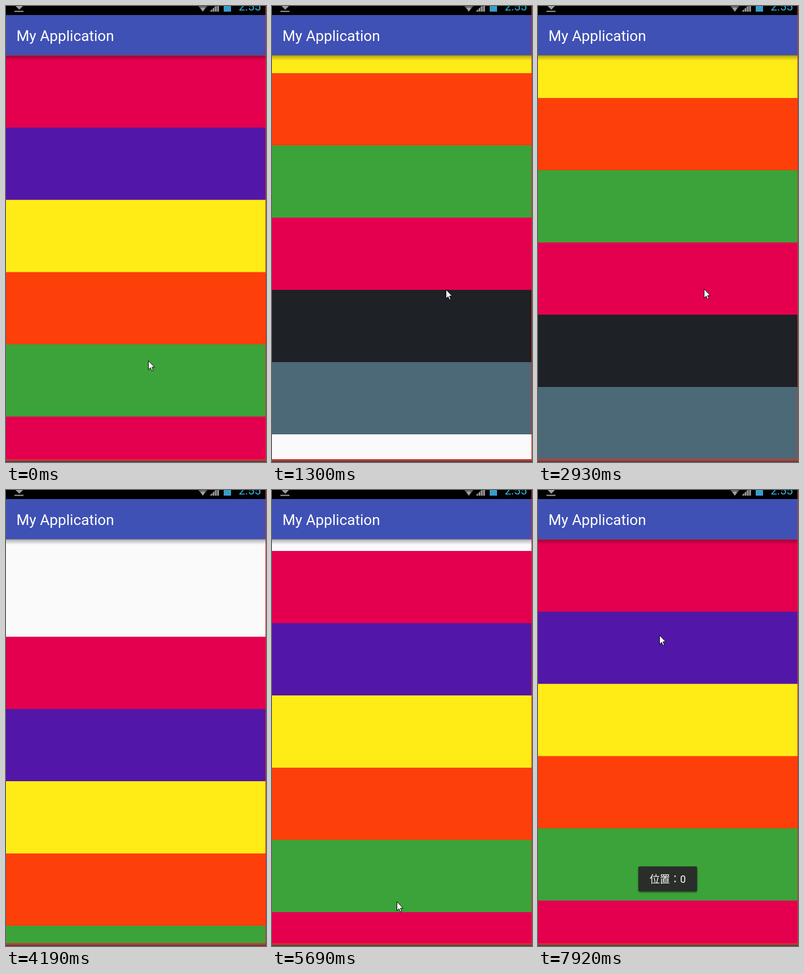
An HTML page for the animation above (8000 ms loop, 461 px wide and 808 px high).

```html
<!DOCTYPE html>
<html lang="ja">
<head>
<meta charset="utf-8">
<title>Overscroll list</title>
<style>
  html, body { margin: 0; width: 100%; height: 100%; overflow: hidden; background: #000; }
  svg { display: block; width: 100vw; height: 100vh; }
  text { font-family: Roboto, "Noto Sans CJK JP", "Noto Sans CJK", sans-serif; }
</style>
</head>
<body>
<svg viewBox="0 0 461 808" preserveAspectRatio="none">
  <defs>
    <linearGradient id="shade" x2="0" y2="1">
      <stop stop-opacity=".5"/>
      <stop offset=".2" stop-opacity=".24"/>
      <stop offset="1" stop-opacity="0"/>
    </linearGradient>
    <radialGradient id="blue">
      <stop stop-color="#1f8fbd" stop-opacity=".75"/>
      <stop offset=".5" stop-color="#2389b3" stop-opacity=".3"/>
      <stop offset="1" stop-color="#2389b3" stop-opacity="0"/>
    </radialGradient>
    <linearGradient id="rim">
      <stop stop-color="#2a8fb8" stop-opacity="0"/>
      <stop offset=".25" stop-color="#2a8fb8"/>
      <stop offset=".75" stop-color="#2a8fb8"/>
      <stop offset="1" stop-color="#2a8fb8" stop-opacity="0"/>
    </linearGradient>
    <filter id="soft" x="-20%" y="-20%" width="140%" height="150%"><feGaussianBlur stdDeviation="1.5"/></filter>
    <clipPath id="view"><rect y="87" width="460" height="716"/></clipPath>
  </defs>

  <g clip-path="url(#view)">
    <rect y="87" width="460" height="716" fill="#fafafa"/>
    <g id="list"></g>
    <g id="glow">
      <ellipse cx="237" cy="804" rx="200" ry="27" fill="url(#blue)"/>
      <rect x="70" y="800" width="335" height="3" fill="url(#rim)"/>
    </g>
    <rect id="bar" x="451" width="5" height="488" fill="#808080" fill-opacity=".6"/>
    <rect y="87" width="460" height="10" fill="url(#shade)"/>
  </g>

  <rect width="460" height="16" fill="#000"/>
  <rect y="16" width="460" height="71" fill="#3f51b5"/>
  <text x="18.5" y="62" font-size="26.2" fill="#fff">My Application</text>
  <g fill="#a0a0a0">
    <path d="M17 0H30L23.5 6.5ZM15 8.5H31V10.5H15Z"/>
    <path d="M341 0H357L349 10Z" fill="#666"/>
    <path d="M345 4Q349 1 353 4L349 10Z"/>
    <path d="M361 10L371 0H378V10Z" fill="#555"/>
    <path d="M364 10V7M368 10V4M372 10V1M376 10V0" stroke="#a0a0a0" stroke-width="2"/>
  </g>
  <rect x="386" width="13" height="10" fill="#3a9dcc"/>
  <text x="412.5" y="8" font-size="20.5" fill="#33b5e5">2:55</text>

  <rect y="803" width="461" height="3" fill="#d9302c"/>
  <rect y="806" width="461" height="2" fill="#454844"/>
  <rect x="460" width="1" height="805" fill="#d9302c"/>

  <g id="toast">
    <rect x="178" y="668.5" width="104" height="44" rx="3" opacity=".6" filter="url(#soft)"/>
    <rect x="178" y="667" width="104" height="44" rx="2" fill="#2a2e2a"/>
    <text x="198" y="696" font-size="18" fill="#fff">位置：0</text>
  </g>
  <path id="cursor" d="M.5 .5V16.5L4.2 13L6.6 18.5L9 17.5L6.7 12H11.5Z" fill="#fff" stroke="#000"/>
</svg>
<script>
const LOOP = 8000, ROW = 128, TOP = 87.5, END = -221, REBOUND = 250;
const colors = ['#e4004f', '#5217a8', '#ffec17', '#fd3f0a', '#3ba339', '#e4004f', '#1e2125', '#4c6978'];
const $ = id => document.getElementById(id);

// Each row reaches one pixel under the next, so no seam shows between them.
$('list').innerHTML = colors.map((c, i) =>
  `<rect y="${i * ROW}" width="460" height="${ROW + (i < colors.length - 1)}" fill="${c}"/>`).join('');

const ramp = (t, from, to) => Math.min(1, Math.max(0, (t - from) / (to - from)));
const easeOut = k => 1 - (1 - k) ** 2;
const pulse = (t, from, until) => ramp(t, from, from + 150) - ramp(t, until, until + 250);

// Drag past the edge, hold, then spring back on release.
const pull = (t, from, to, release, length) =>
  length * (ramp(t, from, to) - easeOut(ramp(t, release, release + REBOUND)));

const scrolled = t => ramp(t, 250, 550) - easeOut(ramp(t, 3050, 3700));

const listY = t => TOP + (END - TOP) * scrolled(t)
  + pull(t, 450, 550, 650, -8)
  + pull(t, 1060, 1990, 2250, -171)
  + pull(t, 3800, 4190, 4330, 172.5)
  + pull(t, 4950, 5390, 5540, 128);

// Mouse strokes: each runs from start to end and stops at x, y.
const home = { x: 252, y: 628 };
const strokes = [
  { start: 250, end: 550, x: 308, y: 360 },
  { start: 650, end: 1060, x: 305, y: 585 },
  { start: 1060, end: 1990, x: 316, y: 266 },
  { start: 2250, end: 2930, x: 294, y: 501 },
  { start: 3050, end: 3500, x: 280, y: 720 },
  { start: 3500, end: 3800, x: 262, y: 470 },
  { start: 3800, end: 4190, x: 250, y: 830 },
  { start: 4330, end: 4950, x: 235, y: 450 },
  { start: 4950, end: 5390, x: 221, y: 729 },
  { start: 6000, end: 6460, x: 192, y: 136 },
  { start: 7600, end: 7920, x: 215, y: 257 }
];

const cursorAt = t => strokes.reduce((p, s) => {
  const k = ramp(t, s.start, s.end);
  return { x: p.x + (s.x - p.x) * k, y: p.y + (s.y - p.y) * k };
}, home);

function draw(t) {
  const y = listY(t), cursor = cursorAt(t);
  $('list').setAttribute('transform', `translate(0 ${y === TOP ? y : Math.round(y)})`);
  $('cursor').setAttribute('transform', `translate(${Math.round(cursor.x)} ${Math.round(cursor.y)})`);
  $('bar').setAttribute('y', 87 + 224 * scrolled(t));
  $('bar').setAttribute('opacity', pulse(t, 250, 900) + pulse(t, 3050, 3800));
  $('glow').setAttribute('opacity', pulse(t, 400, 620));
  $('toast').setAttribute('opacity', ramp(t, 6800, 7280));
}

const begin = performance.now();
function frame() {
  draw((performance.now() - begin) % LOOP);
  requestAnimationFrame(frame);
}
frame();
</script>
</body>
</html>
```
